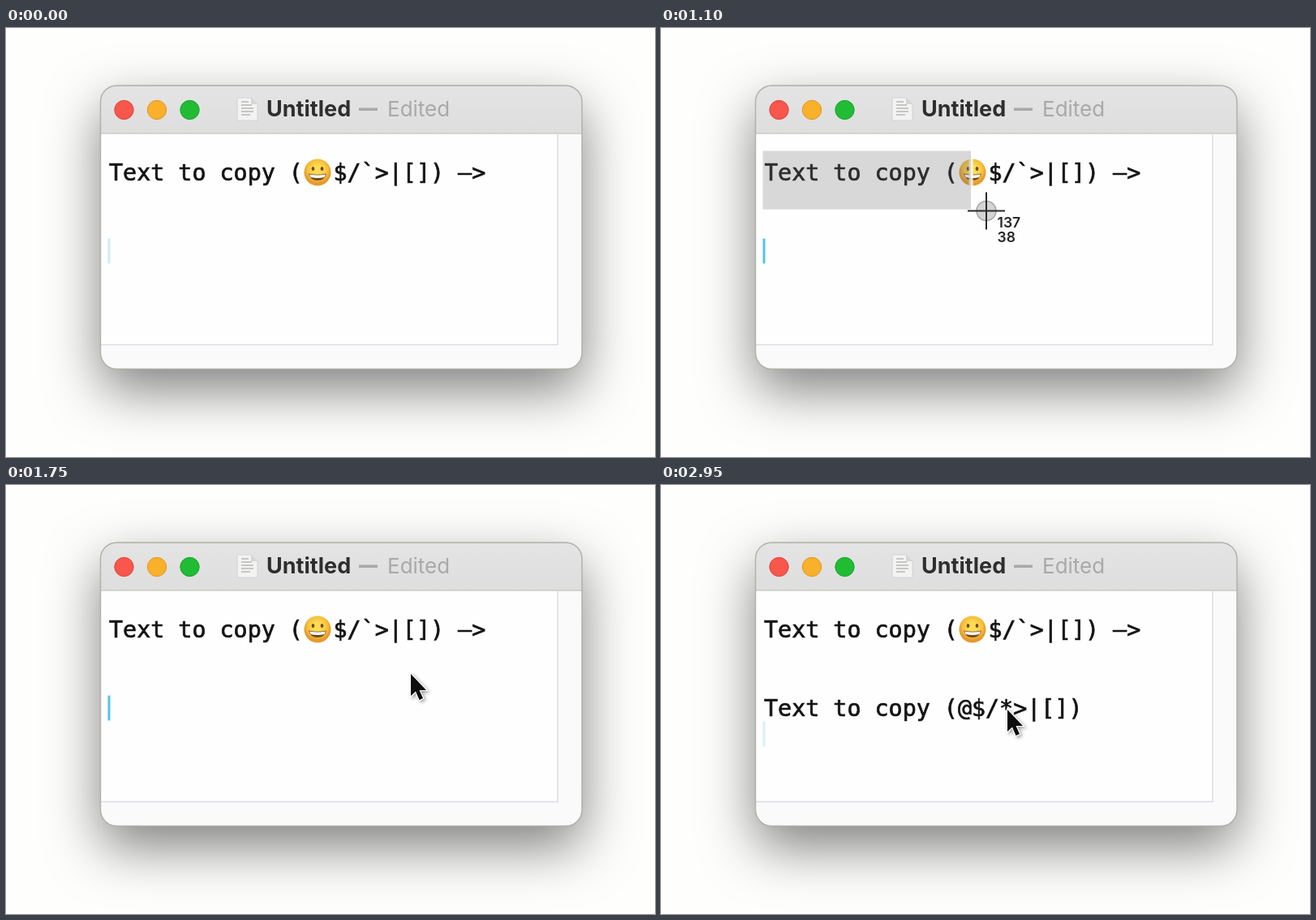
An HTML page for the animation above (3.05 s loop, 800x529 px).

```html
<!DOCTYPE html>
<html lang="en">
<meta charset="utf-8">
<title>Copy text from screen</title>
<style>
  html, body { margin: 0; width: 100%; height: 100%; overflow: hidden; background: #fefefd; }
  .shadow {
    position: absolute; left: 117px; top: 71px; width: 593px; height: 349px; border-radius: 20px;
    box-shadow: 0 26px 66px rgba(0, 0, 0, .5);
  }
  svg { position: absolute; left: 0; top: 0; }
  .title { font: 700 27px Inter, sans-serif; fill: #2e2e2e; }
  .edited { font: 400 26px Inter, sans-serif; fill: #a9a9ab; }
  .mono { font: 28.35px "DejaVu Sans Mono", monospace; fill: #141414; stroke: #141414; stroke-width: .7px; white-space: pre; }
  .size { font: 600 17.5px Inter, sans-serif; fill: #262626; stroke: #fefefe; stroke-width: 2px; paint-order: stroke; }
</style>
<body>
<div class="shadow"></div>
<svg width="800" height="529" viewBox="0 0 800 529">
  <defs>
    <clipPath id="frame"><rect x="117" y="71" width="593" height="349" rx="20"/></clipPath>
    <linearGradient id="bar" x2="0" y2="1">
      <stop stop-color="#e4e4e4"/><stop offset="1" stop-color="#dedede"/>
    </linearGradient>
    <radialGradient id="face" cy=".4">
      <stop offset=".3" stop-color="#fddc55"/><stop offset=".75" stop-color="#f8c03a"/><stop offset="1" stop-color="#e69a2c"/>
    </radialGradient>
    <filter id="soft" x="-50%" y="-50%" width="200%" height="200%">
      <feDropShadow dy="2" stdDeviation="2" flood-color="#000" flood-opacity=".4"/>
    </filter>
  </defs>

  <g clip-path="url(#frame)">
    <rect x="117" y="71" width="593" height="349" fill="#fafafa"/>
    <rect x="117" y="71" width="593" height="59" fill="url(#bar)"/>
    <rect x="117" y="130" width="563" height="260" fill="#fefefe"/>
    <path d="M117 130H710" stroke="#cbcbc6" stroke-width="1.5"/>
    <path d="M680 131V390.500H117" fill="none" stroke="#dcdce2" stroke-width="1.5"/>
  </g>
  <rect x="116.500" y="71" width="593.500" height="349.500" rx="20" fill="none" stroke="#b0b0a8" stroke-width="1.4"/>

  <g stroke-width="1">
    <circle cx="145.500" cy="101" r="11.700" fill="#f9564c" stroke="#dd473f"/>
    <circle cx="186" cy="101" r="11.700" fill="#f9b02a" stroke="#dc9826"/>
    <circle cx="226.500" cy="101" r="11.700" fill="#20bc34" stroke="#1ca32e"/>
  </g>

  <path d="M285 86H302L310 94V114H285Z" fill="#f3f3f3" stroke="#d2d2d2"/>
  <path d="M302 86V94H310Z" fill="#d6d6d6"/>
  <path d="M290 91H299M290 95H303M290 99H305M290 103H305M290 107H301" stroke="#b8b8b4" stroke-width="1.5"/>
  <text class="title" x="321" y="109">Untitled</text>
  <rect x="435" y="98.500" width="23" height="3.500" fill="#a9a9ab"/>
  <text class="edited" x="470" y="109">Edited</text>

  <text class="mono" x="127" y="188">Text to copy (</text>
  <text class="mono" x="403.500" y="188">$/`>|[]) –></text>
  <circle cx="384" cy="178" r="16.500" fill="url(#face)"/>
  <g fill="#6f4a22">
    <ellipse cx="378.500" cy="173.500" rx="1.800" ry="2.600"/>
    <ellipse cx="389.500" cy="173.500" rx="1.800" ry="2.600"/>
    <path d="M373 179.500Q384 182 395 179.500Q393 188 384 188Q375 188 373 179.500Z"/>
  </g>
  <path d="M374 180.500Q384 182.500 394 180.500L392.500 184Q384 186 375.500 184Z" fill="#fff"/>

  <text class="mono" id="pasted" x="127" y="285">Text to copy (@$/*>|[])</text>
  <rect id="caret" x="125.500" width="3" height="31" rx="1" fill="#55c2ee"/>
  <rect id="area" x="125.500" y="151.500" fill="#707070" fill-opacity=".27"
        stroke="#fff" stroke-opacity=".85" stroke-width="5" paint-order="stroke"/>

  <g id="cross">
    <path d="M-23 0H23M0 -23V23" stroke="#fefefe" stroke-width="4" opacity=".6"/>
    <circle r="12" fill="#888" fill-opacity=".35" stroke="#888" stroke-opacity=".7" stroke-width="1.5"/>
    <path d="M-23 0H23M0 -23V23" stroke="#2a2a2a" stroke-width="2"/>
    <text class="size" id="across" x="13.500" y="20"></text>
    <text class="size" id="down" x="13.500" y="38"></text>
  </g>
  <path id="arrow" d="M0 0V27L6 21.500L10.500 32L15 30L10.500 20H19Z" fill="#0a0a0a"
        stroke="#fff" stroke-width="2" paint-order="stroke" filter="url(#soft)"/>
</svg>
<script>
  const LOOP = 3050, STEP = 50;
  const SHOW = 650, PRESS = 800, RELEASE = 1550, PASTE = 2600;
  const ORIGIN = [126.5, 150.2];
  const LAG = 16;

  // Pointer path: time, x, y
  const path = [
    [650, 128, 158], [700, 128, 158], [800, 126.5, 150.2], [900, 170, 185], [1000, 270, 218],
    [1100, 401, 225.5], [1200, 490, 213], [1300, 534, 207], [1450, 546, 206], [1550, 546, 206],
    [1750, 499, 233], [2200, 447, 264], [2600, 427, 277], [2950, 427, 277]
  ];
  const el = id => document.getElementById(id);
  const show = (node, on) => node.style.display = on ? '' : 'none';
  const clamp = v => Math.max(0, Math.min(1, v));
  const [pasted, caret, area, cross, across, down, arrow] =
    ['pasted', 'caret', 'area', 'cross', 'across', 'down', 'arrow'].map(el);

  function slope(i, k) {
    const a = path[i - 1], b = path[i + 1];
    return a && b ? (b[k] - a[k]) / (b[0] - a[0]) : 0;
  }

  // Smooth curve through the path points
  function pointer(t) {
    let i = 0;
    while (i < path.length - 2 && t >= path[i + 1][0]) i++;
    const a = path[i], b = path[i + 1], span = b[0] - a[0], u = clamp((t - a[0]) / span);
    return [1, 2].map(k =>
      a[k] * (1 + 2 * u) * (1 - u) ** 2 + b[k] * u * u * (3 - 2 * u) +
      span * (slope(i, k) * u * (1 - u) ** 2 + slope(i + 1, k) * u * u * (u - 1)));
  }

  function draw(t) {
    const [x, y] = pointer(t);
    const aiming = t >= SHOW && t < RELEASE, dragging = aiming && t > PRESS;
    const done = t >= PASTE;

    show(cross, aiming);
    show(arrow, t >= RELEASE);
    show(area, dragging);
    show(pasted, done);
    (aiming ? cross : arrow).setAttribute('transform', `translate(${x} ${y})`);

    if (dragging) {
      const [sx, sy] = pointer(t - LAG);
      area.setAttribute('width', Math.max(0, sx - 125.5));
      area.setAttribute('height', Math.max(0, sy - 153.5));
      across.textContent = Math.round((x - ORIGIN[0]) / 2);
      down.textContent = Math.round((y - ORIGIN[1]) / 2);
    } else {
      across.textContent = Math.round(428 + x / 2);
      down.textContent = Math.round(415 + y / 2);
    }

    caret.setAttribute('y', done ? 291.5 : 259.5);
    caret.setAttribute('opacity', done ? clamp(1 - (t - 2850) / 130) : clamp(.3 + t / 150));
  }

  const start = performance.now();
  function tick() {
    const t = (performance.now() - start) % LOOP;
    draw(Math.min(2950, Math.floor(t / STEP) * STEP));
    requestAnimationFrame(tick);
  }
  tick();
</script>
</body>
</html>
```
